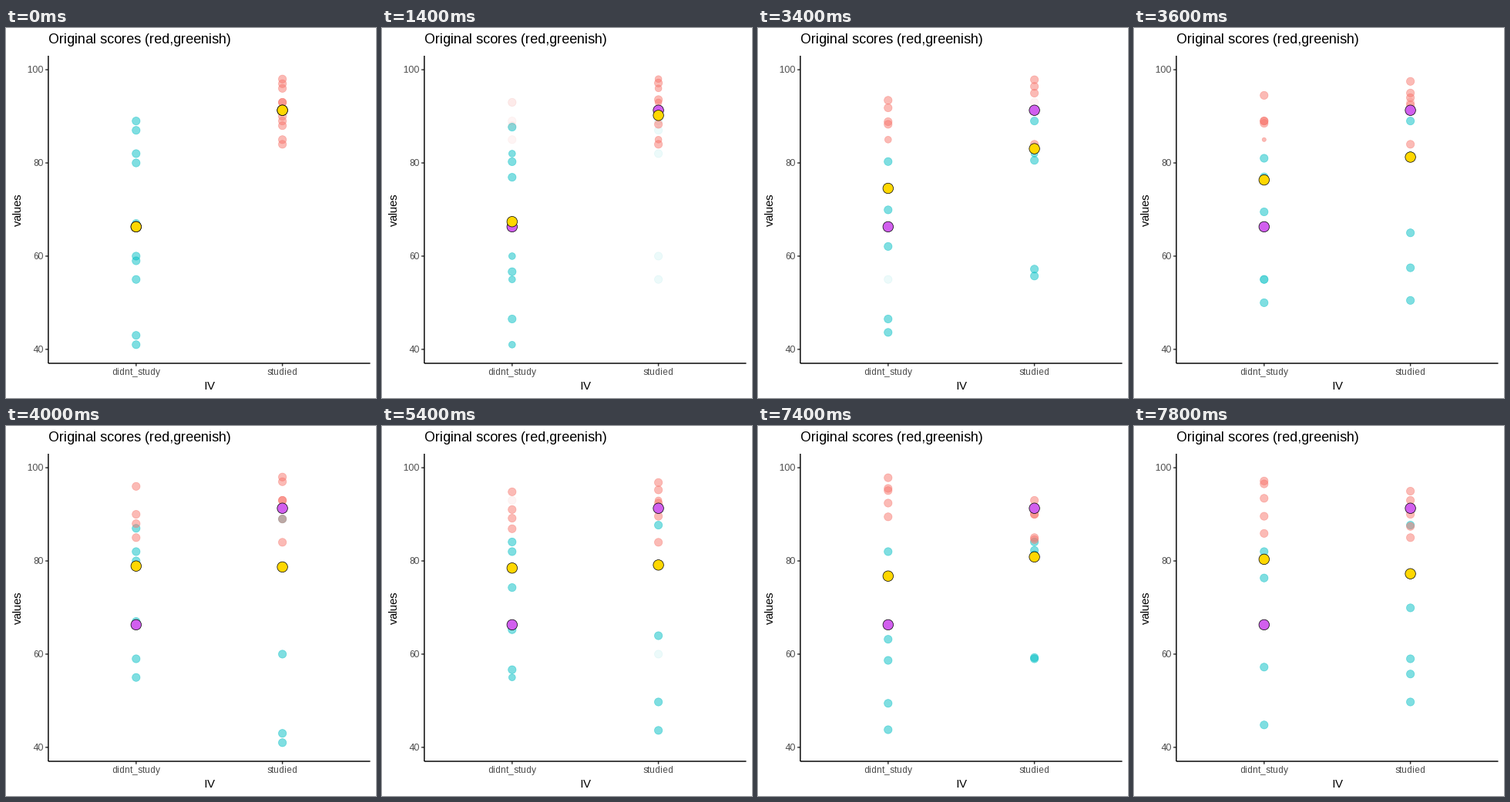
Recreate the animation shown at these times as a matplotlib script. Size 480 by 480 pixels, loop 8 s.

```python
import math

import matplotlib.pyplot as plt
from matplotlib.animation import FuncAnimation
from matplotlib.patches import Circle

plt.rcParams["font.family"] = "Liberation Sans"
plt.rcParams["text.hinting"] = "force_autohint"
plt.rcParams["text.hinting_factor"] = 1

SIZE, DPI = 480, 72
STEP_MS, STEPS, HOLD = 200, 10, 6
TEAL, RED, GOLD, ORCHID = "#00BFC4", "#F8766D", "#FFD700", "#D15FEE"
LEFT, RIGHT, TOP, BOTTOM = 54.9, 472.5, 36, 435
COLS = (168.8, 358.6)
DOT, MEAN, RIM = 5.15, 6.75, 0.71

SCORES = {TEAL: [80, 89, 43, 59, 87, 67, 41, 60, 55, 82],
          RED: [84, 93, 89, 97, 88, 96, 98, 93, 85, 90]}
# scores dealt to the left column by each shuffle; the rest go right
DEALS = [
    {TEAL: SCORES[TEAL], RED: []},
    {TEAL: [59, 80, 67, 43, 41], RED: [93, 93, 89, 88, 85]},
    {TEAL: [80, 82, 87, 67, 59, 55], RED: [96, 85, 88, 90]},
    {TEAL: [41, 82, 67, 55, 43], RED: [88, 98, 96, 97, 93]},
    {TEAL: [60, 82, 41, 80, 87], RED: [98, 97, 93, 84, 89]},
]


def column(state, color, col):
    dealt = DEALS[state][color]
    if col == 0:
        return dealt
    rest = SCORES[color][:]
    for v in dealt:
        rest.remove(v)
    return rest


def column_mean(state, col):
    scores = column(state, TEAL, col) + column(state, RED, col)
    return sum(scores) / len(scores)


def ypix(score):
    return BOTTOM - (score - 37) * (BOTTOM - TOP) / 66


def mix(a, b, p):
    return a + (b - a) * p


fig = plt.figure(figsize=(SIZE / DPI, SIZE / DPI), dpi=DPI, facecolor="white")
ax = fig.add_axes([0, 0, 1, 1])
ax.set_xlim(0, SIZE)
ax.set_ylim(SIZE, 0)
ax.axis("off")


def line(xs, ys, color):
    ax.plot(xs, ys, color=color, lw=1.46, solid_capstyle="butt", snap=False, zorder=1)


def label(x, y, text, size, color="black", va="baseline", **kw):
    ax.text(x, y, text, fontsize=size, color=color, va=va, **kw)


def draw_axes():
    for score in range(40, 101, 20):
        y = ypix(score)
        line([LEFT - 3.75, LEFT], [y, y], "#333333")
        label(48.2, y + 4.3, str(score), 12, "#4D4D4D", ha="right")
    for x, name in zip(COLS, ("didnt_study", "studied")):
        line([x, x], [BOTTOM, BOTTOM + 3.75], "#333333")
        label(x, 450.4, name, 12, "#4D4D4D", ha="center")
    line([LEFT, LEFT], [TOP, BOTTOM], "black")
    line([LEFT, RIGHT], [BOTTOM, BOTTOM], "black")
    label(LEFT, 20.5, "Original scores (red,greenish)", 18)
    label((LEFT + RIGHT) / 2, 469, "IV", 15, ha="center")
    label(22.5, (TOP + BOTTOM) / 2, "values", 15, va="center", ha="right", rotation=90)


draw_axes()
dots = []


def add_dot(col, score, radius, face, edge, alpha=1, z=3):
    dot = Circle((COLS[col], ypix(score)), radius, facecolor=face, edgecolor=edge,
                 linewidth=RIM, alpha=alpha, zorder=z)
    dots.append(ax.add_patch(dot))


def draw_group(color, col, now, then, p):
    shared = min(len(now), len(then))
    for a, b in zip(now, then):
        add_dot(col, mix(a, b, p), DOT, color, color, 0.5)
    for v in now[shared:]:  # leaving: shrink
        add_dot(col, v, DOT * (1 - p), color, color, 0.5)
    if p > 0:
        for v in then[shared:]:  # arriving: fade in
            add_dot(col, v, DOT, color, color, 0.5 * p)


def update(i):
    while dots:
        dots.pop().remove()
    state, step = divmod(i, STEPS)
    p = (1 - math.cos(math.pi * max(0, step - HOLD) / (STEPS - HOLD))) / 2
    for color in SCORES:
        for col in (0, 1):
            draw_group(color, col, column(state, color, col),
                       column(state + 1, color, col), p)
    for col in (0, 1):
        score = mix(column_mean(state, col), column_mean(state + 1, col), p)
        add_dot(col, column_mean(0, col), MEAN, ORCHID, "black", z=5)
        add_dot(col, score, MEAN, GOLD, "black", z=6)
    return dots


anim = FuncAnimation(fig, update, frames=(len(DEALS) - 1) * STEPS, interval=STEP_MS,
                     init_func=lambda: dots, repeat=True, repeat_delay=0, blit=False)
plt.show()
```
